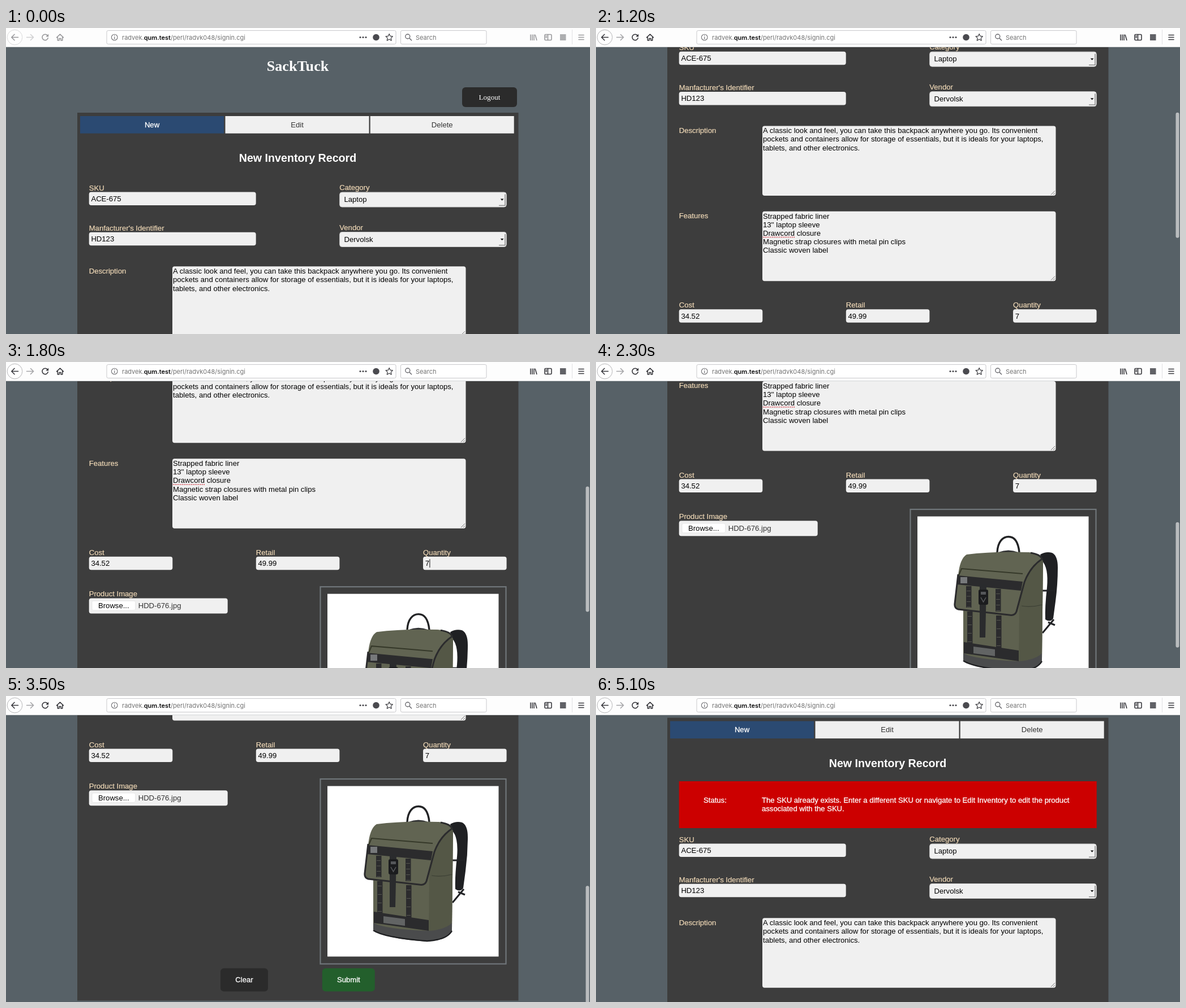
An HTML page for the animation above (5.2 s loop, 1032 by 542 pixels).

```html
<!DOCTYPE html>
<html lang="en">
<head>
<meta charset="utf-8">
<title>Inventory form</title>
<style>
html, body { margin: 0; width: 100%; height: 100%; overflow: hidden; background: #576167; }
svg { display: block; width: 100vw; height: 100vh; }
text { font: 13.11px "Liberation Sans", Arial, sans-serif; white-space: pre; }
.label { fill: #efd8b6; stroke: #efd8b6; stroke-width: .2; }
.light { fill: #fff; stroke: #fff; stroke-width: .3; }
.dark { fill: #333; }
.serif { font-family: "Liberation Serif", Times, serif; fill: #fff; }
.title { font-size: 26.2px; font-weight: bold; }
.head { font-size: 19.67px; font-weight: bold; fill: #fff; }
.ui { font: 11px Inter, Roboto, sans-serif; fill: #737373; }
.mid { text-anchor: middle; }
.line { fill: none; stroke: #38383d; stroke-width: 1.6; stroke-linecap: round; stroke-linejoin: round; }
</style>
</head>
<body>
<svg id="stage" viewBox="0 0 1032 542" preserveAspectRatio="none">
  <rect width="1032" height="542" fill="#576167"/>
  <g id="page">
    <rect id="panel" x="126" y="150" width="779.5" height="1043" fill="#3d3d3d"/>
    <g id="top"></g>
    <g id="status"></g>
    <g id="form"></g>
  </g>
  <rect id="thumb" x="1024.5" width="6" height="222" rx="3" fill="#b9bcbe"/>
  <g id="bar">
    <rect width="1032" height="33.5" fill="#fdfdfd"/>
    <rect y="33" width="1032" height="1" fill="#d4d6d8"/>
    <g id="tools">
      <circle cx="15.5" cy="16.5" r="13.3" fill="#fff" stroke="#b4b4b6"/>
      <path class="line" d="M21.5 16.5H10M15 11.3L9.8 16.5L15 21.7"/>
      <path class="line" style="stroke:#a5a5a8" d="M36.5 16.5H48M43.5 11.5L48.6 16.5L43.5 21.5"/>
      <path class="line" d="M73.3 13.2A5.2 5.2 0 1 0 74.2 17.8"/>
      <path d="M75.2 10.5V15.4H70.3Z" fill="#38383d"/>
      <path class="line" d="M89.5 16.8L95.5 11L101.5 16.8M91.3 16.5V22H94V18.5H97V22H99.7V16.5"/>
      <path class="line" style="stroke-linecap:butt" d="M927 11.5V22M930 11.5V22M933 11.5V22M935 11.7L938 22"/>
      <rect class="line" x="952" y="11.5" width="12" height="10" rx="1.5"/>
      <path class="line" d="M957.5 11.5V21.5M954 14.2H955.5M954 16.6H955.5"/>
      <rect x="979" y="11" width="10.5" height="11" fill="#606166"/>
      <path class="line" d="M1012 12.5H1021M1012 16.5H1021M1012 20.5H1021"/>
    </g>
    <path d="M1000.5 3V29" stroke="#e2e2e4"/>
    <g fill="#fff" stroke="#c9c9cc">
      <rect x="178" y="4.5" width="511" height="24" rx="2.5"/>
      <rect x="697.5" y="4.5" width="151.5" height="24" rx="2.5"/>
    </g>
    <circle cx="191.7" cy="16.5" r="5.3" fill="none" stroke="#707074" stroke-width="1.1"/>
    <path d="M191.7 13.3V14.6M191.7 15.9V19.6" stroke="#707074" stroke-width="1.3"/>
    <text class="ui" x="205" y="20.5">radvek.<tspan font-weight="600" fill="#0c0c0d">qum.test</tspan>/perl/radvk048/signin.cgi</text>
    <g fill="#4a4a4f">
      <circle cx="626" cy="16.5" r="1.6"/><circle cx="631" cy="16.5" r="1.6"/><circle cx="636" cy="16.5" r="1.6"/>
      <circle cx="654" cy="16.5" r="5.8"/>
    </g>
    <path class="line" style="stroke-width:1.2" d="M677.2 10.4L679.1 14.4L683.4 14.9L680.2 17.9L681.1 22.2L677.2 20L673.3 22.2L674.2 17.9L671 14.9L675.3 14.4Z"/>
    <circle cx="709.8" cy="15" r="4" fill="none" stroke="#6b6b70" stroke-width="1.4"/>
    <path d="M712.8 18L717 22.2" stroke="#6b6b70" stroke-width="1.6"/>
    <text class="ui" x="724" y="20.5">Search</text>
  </g>
</svg>
<script>
const $ = id => document.getElementById(id);
const LINE = 15.2, FIELD = '#f0f0f0';

const box = (x, y, w, h, fill, r = 0, more = '') =>
  `<rect x="${x}" y="${y}" width="${w}" height="${h}" rx="${r}" fill="${fill}" ${more}/>`;
const text = (x, y, s, cls = '') => `<text x="${x}" y="${y}" class="${cls}">${s}</text>`;
const path = (d, fill, stroke = 'none', w = 1, more = '') =>
  `<path d="${d}" fill="${fill}" stroke="${stroke}" stroke-width="${w}" ${more}/>`;
const lines = (x, y, list, cls) => list.map((s, i) => text(x, y + i * LINE, s, cls)).join('');

const input = (x, y, w, label, value) =>
  text(x, y - 3, label, 'label') + box(x, y, w, 23.5, FIELD, 4) + text(x + 3.7, y + 16.4, value);

const select = (y, label, value) =>
  text(589.3, y - 3.2, label, 'label') +
  box(589.7, y + .5, 294.5, 26, FIELD, 4, 'stroke="#d0d0d0"') +
  path(`M871 ${y + 23.8}H882V${y + 4}`, 'none', '#666', 1.1) +
  path(`M873.8 ${y + 12}h5.6l-2.8 3.2z`, '#111') +
  text(597.5, y + 17.8, value);

const area = (y, label, list) =>
  text(146.7, y + 12.4, label, 'label') + box(294, y, 518.5, 123.5, FIELD, 4) +
  path(`M804 ${y + 122}l7 -7M808 ${y + 122}l3 -3`, 'none', '#777') +
  lines(295, y + 12.9, list);

const button = (x, y, w, h, fill, s, cls) =>
  box(x, y, w, h, fill, 6) + text(x + w / 2, y + h / 2 + 4.7, s, cls + ' mid');

// Plain flat rucksack
function pack() {
  const olive = '#5e614f', black = '#2b2b2d';
  const ladder = (x, y, h) => box(x, y, 9.5, h, black) +
    [0, 1, 2, 3].map(i => box(x + 1, y + 8 + i * h / 4, 7, 1, '#55564f')).join('');
  return '<g transform="translate(0 653.5)">' +
    path('M785 227Q795 221 806 224Q816 229 816 250Q816 280 812 310L808 340Q803 348 794 342Q793 320 797 285Q800 250 788 238Z', '#1f2023') +
    path('M788 291H812M809 342L789 366M799 347L811 352', 'none', '#222326', 3) +
    path('M709 223C710 204 719 195.500 729 195.500S746 204 748 223', 'none', '#222325', 3.4) +
    path('M711 223Q729 216 746 223Z', '#303133') +
    path('M649 315V408Q660 426 745 434Q778 432 788 414L790 238L750 235Z', olive) +
    path('M748 316L758 274Q772 242 788 234L790 240L788 412Q775 426 747 432Z', '#545746') +
    path('M752 318Q770 321 788 316', 'none', '#3b3f34', 1.2) +
    ladder(656, 328, 60) + ladder(707, 335, 60) +
    path('M650 382L747 397V416L650 402Z', black) +
    path('M649 402Q670 413 747 416Q776 414 788 402V416Q779 433 744 435Q670 430 649 414Z', '#4a4b4c') +
    path('M649 415Q668 428 744 434Q779 432 788 416', 'none', '#202123', 2.4) +
    path('M667 390L705 395V407L667 402Z', '#626464') +
    path('M640 264Q643 234 655 227Q700 221 765 223Q787 226 788 235Q767 249 757 276L743 328Q740 336 730 334L640 324Q633 322 634 314Z', '#616452') +
    path('M640 262L634 314Q633 322 640 324L730 334Q740 336 743 328L757 276Q767 249 788 235Q786 227 768 224', 'none', black, 3) +
    path('M641 264L646 252L754 261', 'none', '#353829', 2) +
    path('M639 264L754 275L751 291L638 280Z', black) +
    ladder(654, 283, 38) + ladder(706, 288, 40) +
    box(644, 267, 12, 11, '#77797b') +
    path('M678 280H690L688 374H678Z', '#2a2b2d') +
    box(676, 289, 17, 27, '#1b1c1e', 3) + box(680, 293, 9, 5, '#55575a') +
    path('M680 303L684.500 311L689 303', 'none', '#5b5d60', 1.4) + '</g>';
}

$('top').innerHTML =
  text(515.5, 75.5, 'SackTuck', 'serif title mid') +
  button(806, 105, 97, 35, '#2b2b2b', 'Logout', 'serif') +
  [['New', 131, '#2b4a72', 'light'], ['Edit', 387.5, FIELD, 'dark'], ['Delete', 643.7, FIELD, 'dark']]
    .map(([s, x, fill, cls]) => box(x, 156, 254, 30.7, fill) + text(x + 127, 175.6, s, cls + ' mid')).join('') +
  text(515.5, 237.3, 'New Inventory Record', 'head mid');

$('status').innerHTML =
  box(146.7, 262.5, 738, 83, '#c00') + text(190, 300.5, 'Status:', 'light') +
  lines(293, 300.5, ['The SKU already exists. Enter a different SKU or navigate to Edit Inventory to edit the product',
    'associated with the SKU.'], 'light');

$('form').innerHTML =
  input(146.7, 290.5, 295, 'SKU', 'ACE-675') + select(290.5, 'Category', 'Laptop') +
  input(146.7, 361.7, 295, "Manfacturer's Identifier", 'HD123') + select(361, 'Vendor', 'Dervolsk') +
  area(422.2, 'Description', [
    'A classic look and feel, you can take this backpack anywhere you go. Its convenient',
    'pockets and containers allow for storage of essentials, but it is ideals for your laptops,',
    'tablets, and other electronics.']) +
  area(573.5, 'Features', ['Strapped fabric liner', "13'' laptop sleeve", 'Drawcord closure',
    'Magnetic strap closures with metal pin clips', 'Classic woven label']) +
  path('M295 619.3H351', 'none', '#d3303c', 1.5, 'stroke-dasharray="1.6 1.6"') +
  input(146.7, 747, 147.6, 'Cost', '34.52') +
  input(441.8, 747, 147.6, 'Retail', '49.99') +
  input(737, 747, 147.6, 'Quantity', '7') +
  '<rect id="caret" x="748.4" y="751.500" width="1" height="15" fill="#111"/>' +
  text(146.7, 817.8, 'Product Image', 'label') + box(146.7, 820.8, 245, 27, FIELD, 4) +
  box(152, 825.5, 76.5, 16.5, '#fff', 2.5, 'stroke="#e2e2e2" stroke-width=".7"') +
  text(163, 838.4, 'Browse...') + text(233.7, 838.4, 'HDD-676.jpg', 'dark') +
  box(555.5, 800.5, 328, 327.5, '#3d3d3d', 0, 'stroke="#70767a" stroke-width="2.2"') +
  box(568, 813, 302.5, 302, '#fff') + pack() +
  button(379, 1135.7, 84, 41, '#2b2b2b', 'Clear', 'light') +
  button(558.8, 1135.7, 93, 41, '#235f2c', 'Submit', 'light');

// [ms, scroll offset]
const scroll = [[600, 0], [700, 18], [800, 61], [1200, 248.8], [1600, 347.5], [2300, 539.5], [2400, 653.5]];
const LOOP = 5200, STEP = 100, ACTIVE = 200, RELOAD = 4500;

function offset(t) {
  if (t >= RELOAD) return 111.5;
  const i = scroll.findIndex(k => k[0] > t);
  if (i === 0) return 0;
  if (i < 0) return scroll[scroll.length - 1][1];
  const [t0, a] = scroll[i - 1], [t1, b] = scroll[i];
  return a + (b - a) * (t - t0) / (t1 - t0);
}

const show = (id, on) => $(id).setAttribute('visibility', on ? 'visible' : 'hidden');

function draw(now) {
  const t = Math.floor(now % LOOP / STEP) * STEP;
  const y = offset(t), failed = t >= RELOAD;
  $('page').setAttribute('transform', `translate(0 ${-y})`);
  $('form').setAttribute('transform', `translate(0 ${failed ? 82.5 : 0})`);
  $('panel').setAttribute('height', failed ? 1125.5 : 1043);
  $('thumb').setAttribute('y', 35 + y * .461);
  $('tools').setAttribute('opacity', t < ACTIVE ? .5 : 1);
  show('status', failed);
  show('thumb', t > 600 && !failed);
  show('caret', t >= 1600 && !failed && t % 1000 >= 600);
}

const start = performance.now();
function tick() {
  draw(performance.now() - start);
  requestAnimationFrame(tick);
}
tick();
</script>
</body>
</html>
```
